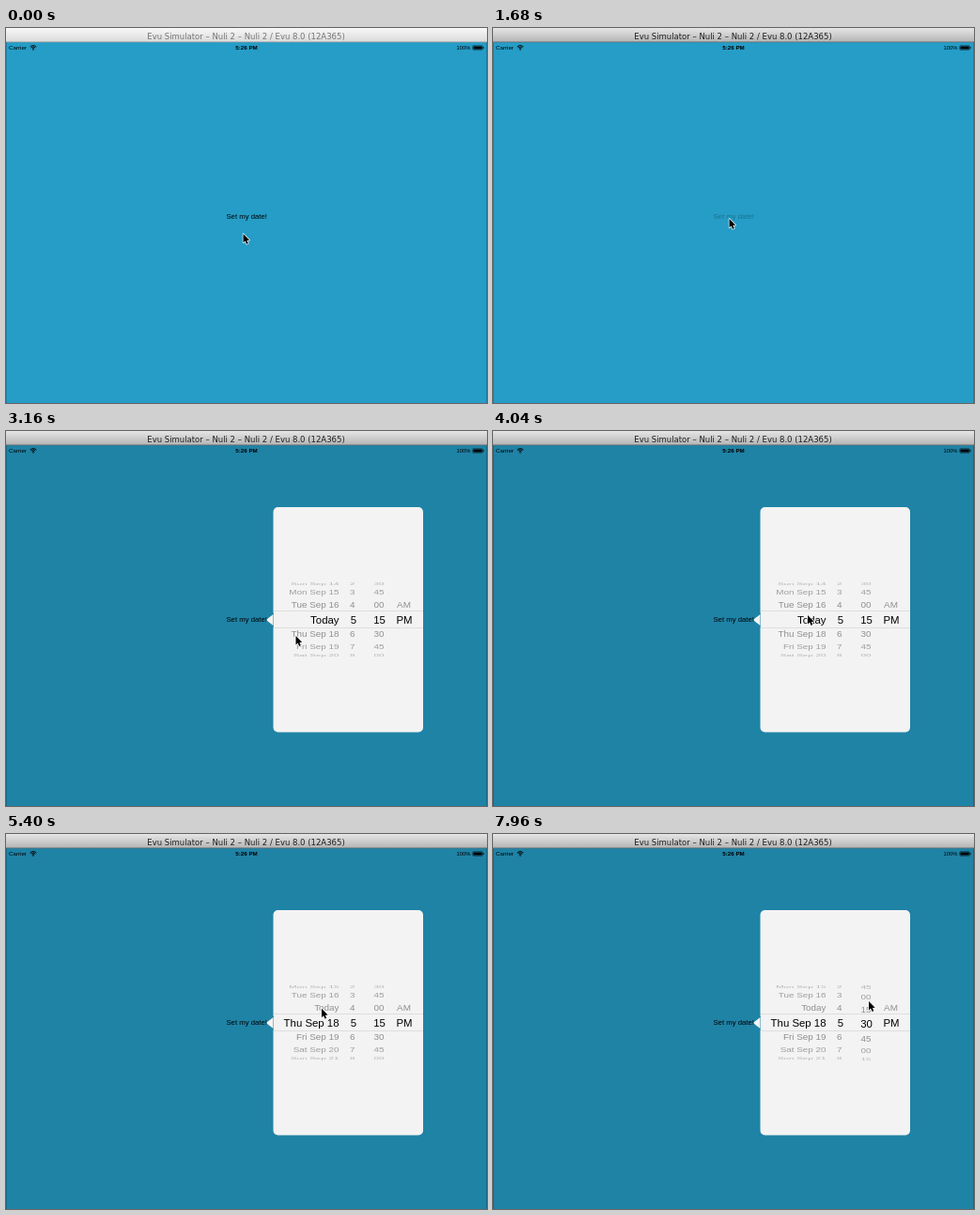
Write an HTML page with a canvas that moves like this. It is 512 px wide and 399 px high and loops after 8000 ms.

```html
<!DOCTYPE html>
<html lang="en">
<head>
<meta charset="utf-8">
<title>Date picker popover</title>
<style>
  html, body { margin: 0; width: 100%; height: 100%; overflow: hidden; background: #259dc7; }
  canvas { display: block; width: 512px; height: 399px; }
</style>
</head>
<body>
<canvas id="stage"></canvas>
<script>
const W = 512, H = 399, LOOP = 8000;
const MID = 200.5, RADIUS = 41.8, STEP = 0.38, ROW = 16;
const BAND = { top: 191.5, bottom: 209.5 };
const SANS = '"Liberation Sans", Arial, sans-serif';
const TITLE = 'Evu Simulator – Nuli 2 – Nuli 2 / Evu 8.0 (12A365)';

const canvas = document.getElementById('stage');
const ctx = canvas.getContext('2d');
const dpr = window.devicePixelRatio || 1;
canvas.width = W * dpr;
canvas.height = H * dpr;

const clamp = v => Math.max(0, Math.min(1, v));
const smooth = p => p * p * (3 - 2 * p);

// Eased interpolation through [time, ...values] stops
function track(stops, t) {
  let i = 0;
  while (i < stops.length - 2 && t >= stops[i + 1][0]) i++;
  const [a, b] = [stops[i], stops[i + 1]];
  const p = smooth(clamp((t - a[0]) / (b[0] - a[0])));
  return a.slice(1).map((v, k) => v + (b[k + 1] - v) * p);
}

const cursorPath = [
  [0, 252.5, 219], [500, 252.5, 219], [1400, 251.5, 203], [1960, 251.5, 203],
  [2240, 249.5, 209], [2560, 249.5, 209], [3160, 308.5, 218], [3600, 308.5, 218],
  [4040, 335, 196], [4240, 335, 196], [5120, 335.5, 184], [5480, 336, 186],
  [5880, 371, 199], [6440, 386, 199], [6720, 400.5, 193], [7240, 400.5, 193],
  [8060, 400, 177.5]
];
const dateScroll = [[0, 0], [4240, 0], [5120, 0.75], [5440, 1], [8000, 1]];
const minuteScroll = [[0, 0], [7240, 0], [8060, 0.93]];

const weekdays = ['Sun', 'Mon', 'Tue', 'Wed', 'Thu', 'Fri', 'Sat'];
const dateLabel = i => i === 0 ? 'Today' : weekdays[(i + 10) % 7] + ' Sep ' + (17 + i);
const hourLabel = i => String(5 + i);
const minuteLabel = i => ['00', '15', '30', '45'][(i + 9) % 4];
const periodLabel = i => i === 0 ? 'PM' : i === -1 ? 'AM' : '';

function text(str, x, y, size, { align = 'center', color = '#000', weight = '', family = SANS } = {}) {
  ctx.font = `${weight} ${size}px ${family}`;
  ctx.textAlign = align;
  ctx.fillStyle = color;
  ctx.fillText(str, x, y + size * 0.36);
}

function clipped(rects, paint) {
  ctx.save();
  ctx.beginPath();
  rects.forEach(r => ctx.rect(...r));
  ctx.clip();
  paint();
  ctx.restore();
}

function wheel(label, scroll, x, lensX, align) {
  const base = Math.round(scroll);
  const rows = [];
  for (let i = base - 4; i <= base + 4; i++) rows.push(i);

  const outside = [
    [285, 159.5, 159, BAND.top - 159.5],
    [285, BAND.bottom, 159, 241 - BAND.bottom]
  ];
  clipped(outside, () => rows.forEach(i => {
    const angle = (i - scroll) * STEP;
    if (Math.abs(angle) > 1.4) return;
    const squash = Math.cos(angle);
    ctx.save();
    ctx.translate(x, MID + RADIUS * Math.sin(angle));
    ctx.scale(1, squash);
    text(label(i), 0, 0, 9.9, { align, color: `rgba(0,0,0,${0.43 * squash ** 0.6})` });
    ctx.restore();
  }));

  clipped([[285, BAND.top, 159, BAND.bottom - BAND.top]], () => rows.forEach(i => {
    text(label(i), lensX, MID + (i - scroll) * ROW, 11.4, { align });
  }));
}

function popover(t) {
  ctx.fillStyle = '#f3f3f3';
  ctx.beginPath();
  ctx.roundRect(284.5, 81, 159.5, 239.5, 5);
  ctx.moveTo(285, 193);
  ctx.bezierCurveTo(285, 196.5, 277.6, 199, 277.6, 201);
  ctx.bezierCurveTo(277.6, 203, 285, 205.5, 285, 209);
  ctx.closePath();
  ctx.fill();

  ctx.fillStyle = '#d6d6d6';
  ctx.fillRect(285, 191, 159, 0.7);
  ctx.fillRect(285, 209, 159, 0.7);

  wheel(dateLabel, track(dateScroll, t)[0], 354.5, 354.5, 'right');
  wheel(hourLabel, 0, 371.6, 373.1, 'right');
  wheel(minuteLabel, track(minuteScroll, t)[0], 397, 397.5, 'center');
  wheel(periodLabel, 0, 423.5, 424, 'center');
}

function titleBar(active) {
  const shade = ctx.createLinearGradient(0, 0, 0, 15);
  shade.addColorStop(0, active ? '#e6e6e6' : '#f8f8f8');
  shade.addColorStop(1, active ? '#b4b4b4' : '#dadada');
  ctx.fillStyle = shade;
  ctx.fillRect(0, 0, W, 15);
  ctx.fillStyle = active ? '#6c6c6c' : '#9a9a9a';
  ctx.fillRect(0, 14.5, W, 0.8);
  text(TITLE, 255.5, 9, 8.5, {
    color: active ? '#1c1c1c' : '#747474',
    family: '"DejaVu Sans", sans-serif'
  });
}

function statusBar() {
  text('Carrier', 3, 21.2, 6.2, { align: 'left' });
  text('5:26 PM', 256, 21.2, 6.2, { weight: 'bold' });
  text('100%', 494.3, 21.2, 5.8, { align: 'right' });

  ctx.strokeStyle = ctx.fillStyle = '#000';
  ctx.lineWidth = 0.9;
  [1.7, 3.3, 4.7].forEach(r => {
    ctx.beginPath();
    ctx.arc(29, 23.3, r, -Math.PI * 0.75, -Math.PI * 0.25);
    ctx.stroke();
  });
  ctx.beginPath();
  ctx.arc(29, 23, 0.7, 0, Math.PI * 2);
  ctx.fill();

  ctx.lineWidth = 0.5;
  ctx.beginPath();
  ctx.roundRect(496.8, 18.8, 10.6, 4.4, 0.9);
  ctx.stroke();
  ctx.fillRect(497.5, 19.5, 9.2, 3);
  ctx.fillRect(507.8, 20.2, 0.8, 1.6);
}

function cursor([x, y]) {
  const outline = [[0, 0], [0, 9.4], [2.1, 7.5], [3.6, 10.9], [5.3, 10.1], [3.9, 6.9], [6.7, 6.7]];
  ctx.save();
  ctx.translate(x, y);
  ctx.beginPath();
  outline.forEach(p => ctx.lineTo(...p));
  ctx.closePath();
  ctx.lineJoin = 'round';
  ctx.lineWidth = 1.4;
  ctx.strokeStyle = '#fff';
  ctx.stroke();
  ctx.fillStyle = '#000';
  ctx.fill();
  ctx.restore();
}

function draw(t) {
  ctx.setTransform(dpr, 0, 0, dpr, 0, 0);
  ctx.globalAlpha = 1;
  ctx.fillStyle = '#259dc7';
  ctx.fillRect(0, 0, W, H);

  statusBar();
  const pressed = t >= 1560 && t < 1760;
  text('Set my date!', 256.2, 200.7, 7.75, { color: pressed ? 'rgba(0,0,0,0.27)' : '#000' });

  const shown = smooth(clamp((t - 1760) / 300));
  ctx.fillStyle = `rgba(0,0,0,${0.17 * shown})`;
  ctx.fillRect(0, 15, W, H - 15);
  ctx.fillStyle = 'rgba(0,0,0,0.3)';
  ctx.fillRect(0, 15, 0.6, H - 15);
  ctx.fillRect(W - 0.6, 15, 0.6, H - 15);

  titleBar(t >= 1520);
  if (shown > 0) {
    ctx.globalAlpha = shown;
    popover(t);
    ctx.globalAlpha = 1;
  }
  cursor(track(cursorPath, t));
}

function tick() {
  draw(performance.now() % LOOP);
  requestAnimationFrame(tick);
}
tick();
</script>
</body>
</html>
```
